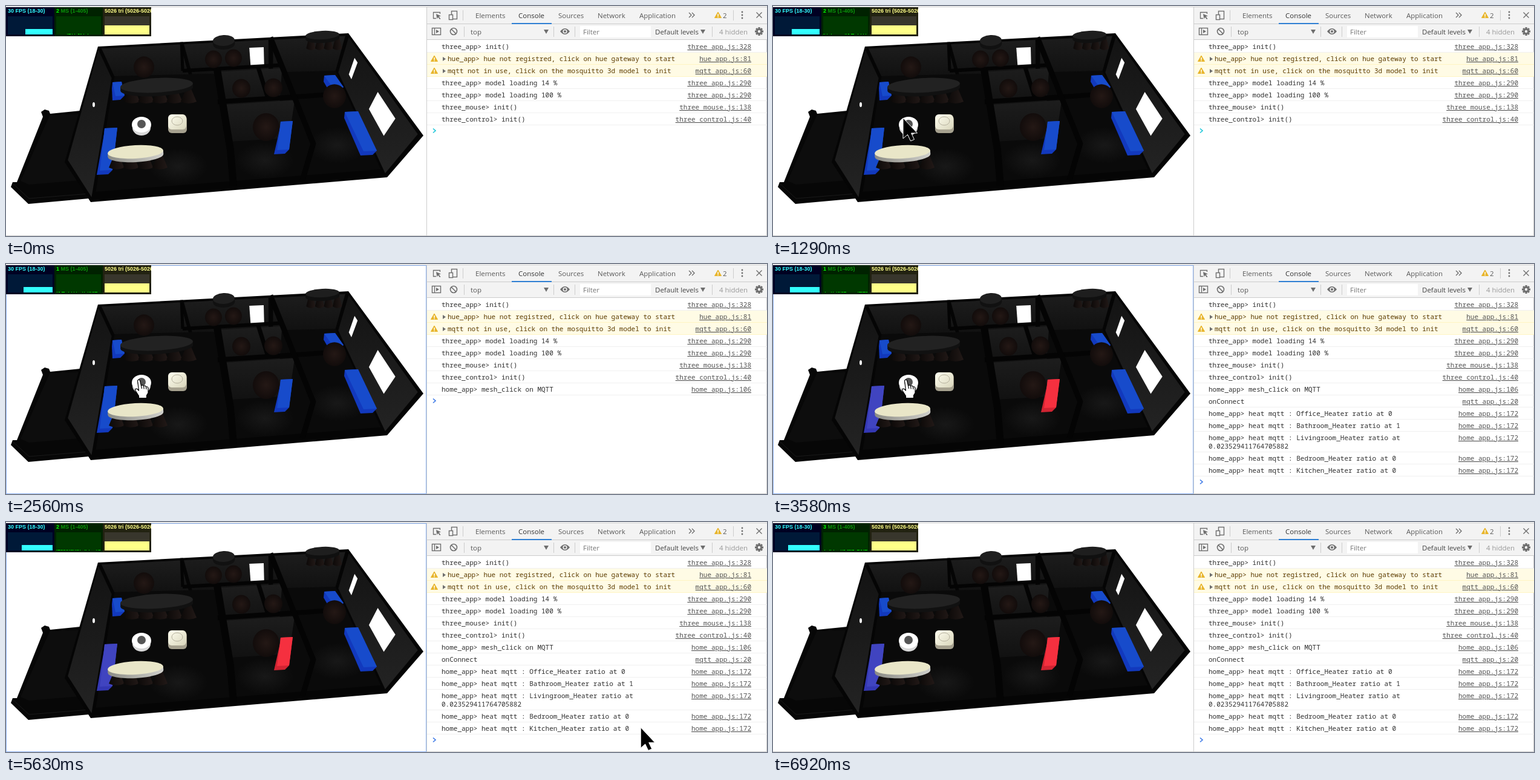
These frames come from a looping animation (1258 by 380 pixels, 6970 ms). An HTML page:

```html
<!DOCTYPE html>
<html lang="en">
<head>
<meta charset="utf-8">
<title>Home model and console</title>
<style>
html, body { margin: 0; width: 100%; height: 100%; overflow: hidden; background: #fff; }
svg { display: block; width: 1258px; height: 380px; }
text { white-space: pre; }
.ui { font: 11.5px "Open Sans", sans-serif; fill: #5a5a5a; }
.log { font: 11px "Noto Sans Mono", monospace; fill: #303030; }
.stat { font: bold 9px "Liberation Sans", Arial, sans-serif; }
</style>
</head>
<body>
<svg id="stage" viewBox="0 0 1258 380" xmlns="http://www.w3.org/2000/svg"></svg>
<script>
const LOOP = 6970, STEPS = 90;
const HAND_ON = 1700, CLICK = 2480, CONNECT = 3190, HEAT = 3270, LEAVE = 3840, BLUR = 6750;
// Cursor key points: time, x, y
const ENTER = [[70, 1076, 355], [225, 927, 300], [300, 777, 290], [530, 330, 301], [1140, 215, 185]];
const EXIT = [[LEAVE, 215, 185], [4320, 384, 297], [4490, 657, 330], [5040, 916, 331], [5650, 1048, 339], [6000, 1168, 384]];

const poly = (pts, fill, more = '') => `<polygon points="${pts}" fill="${fill}" ${more}/>`;
const rect = (x, y, w, h, fill, more = '') => `<rect x="${x}" y="${y}" width="${w}" height="${h}" fill="${fill}" ${more}/>`;
const oval = (x, y, rx, ry, fill, more = '') => `<ellipse cx="${x}" cy="${y}" rx="${rx}" ry="${ry}" fill="${fill}" ${more}/>`;
const line = (d, color, w = 1) => `<path d="${d}" fill="none" stroke="${color}" stroke-width="${w}"/>`;
const text = (cls, x, y, s, more = '') => `<text class="${cls}" x="${x}" y="${y}" ${more}>${s.replace(/>/g, '&gt;')}</text>`;
const grad = (id, a, b, dir) => `<linearGradient id="${id}" ${dir}><stop stop-color="${a}"/><stop offset="1" stop-color="${b}"/></linearGradient>`;
const glow = (id, a, b) => `<radialGradient id="${id}"><stop stop-color="${a}"/><stop offset="1" stop-color="${b}"/></radialGradient>`;
const repeat = (n, f) => Array.from({length: n}, (_, i) => f(i)).join('');

const defs = '<defs>' +
  grad('wall', '#1d1d1d', '#111', 'x2="0" y2="1"') +
  grad('side', '#131313', '#232323', 'x2="0" y2="1"') +
  grad('cone', '#0c0908', '#221917', 'x2="1" y2="0"') +
  grad('cream', '#fffef0', '#d9d6bc', 'x2="1" y2="1"') +
  grad('rim', '#8c8c86', '#d0d0cb', 'x2="1" y2="0"') +
  glow('ball', '#241815', '#120c0b') + glow('floor', '#181818', '#0a0a0a') +
  '<clipPath id="tri"><rect x="160" y="2" width="80" height="48"/></clipPath></defs>';

// Projective map from the unit square to four screen corners.
function plane([[x0, y0], [x1, y1], [x2, y2], [x3, y3]]) {
  const ax = x1 - x2, ay = y1 - y2, bx = x3 - x2, by = y3 - y2;
  const sx = x0 - x1 + x2 - x3, sy = y0 - y1 + y2 - y3, det = ax * by - bx * ay;
  const g = (sx * by - bx * sy) / det, h = (ax * sy - sx * ay) / det;
  return (u, v) => {
    const w = 1 + g * u + h * v;
    return [(x0 + (x1 - x0 + g * x1) * u + (x3 - x0 + h * x3) * v) / w,
      (y0 + (y1 - y0 + g * y1) * u + (y3 - y0 + h * y3) * v) / w];
  };
}
const roof = plane([[152, 67], [566, 45], [690, 214], [97, 258]]);
const ground = plane([[175, 116], [548, 107], [630, 283], [140, 324]]);

// Plan position u, v at height h (0 floor, 1 wall top).
function at(u, v, h) {
  const a = ground(u, v), b = roof(u, v);
  return a.map((n, i) => (n + (b[i] - n) * h).toFixed(1)).join();
}
const wall = (u0, v0, u1, v1, fill, low = 0, high = .93) =>
  poly([at(u0, v0, low), at(u1, v1, low), at(u1, v1, high), at(u0, v0, high)].join(' '), fill);
const beam = (u0, v0, u1, v1, w) =>
  line(`M${at(u0, v0, 1)}L${at(u1, v1, 1)}${v1 === 1 ? 'L' + at(u1, v1, .1) : ''}`, '#040404', w);

const ball = ([x, y, r]) => oval(x, y, r, r * 1.04, 'url(#ball)');
const disc = (x, y, rx, ry, h, top, side) =>
  `<g transform="rotate(-3 ${x} ${y})">${oval(x, y + h, rx, ry, side)}${rect(x - rx, y, 2 * rx, h, side)}${oval(x, y, rx, ry, top)}</g>`;

function table(x, y, rx, ry, stools, top, side) {
  const w = rx * 1.1 / stools, foot = y + 15 + ry;
  return repeat(stools, i => {
    const cx = x + rx * (-.68 + 1.56 * i / (stools - 1));
    return `<path d="M${cx - w * .35} ${foot - 20}h${w * .7}L${cx + w} ${foot}q${-w} 6 ${-2 * w} 0Z" fill="url(#cone)"/>`;
  }) + disc(x, y, rx, ry, 6, top, side);
}

// Slab with its top edge at x, y, running along ex, ey.
function heater(id, x, y, w, ex, ey) {
  const bx = x + ex, by = y + ey;
  return poly(`${x},${y} ${x + w},${y - 1} ${bx + w},${by - 1} ${bx + w - 7},${by + 6} ${bx - 5},${by + 7} ${x - 1},${y + 10}`, '#1239bd', `id="${id}Side"`) +
    poly(`${x},${y} ${x + w},${y - 1} ${bx + w},${by - 1} ${bx},${by}`, '#174bcb', `id="${id}Face"`);
}

function house() {
  const hull = [at(0, 0, 1), at(1, 0, 1), at(1, 1, 1), at(1, 1, 0), at(0, 1, 0), at(0, 1, 1)].join(' ');
  const lamps = [[228, 101, 17], [343, 88, 14], [376, 86, 14], [389, 136, 15], [442, 135, 15], [430, 200, 22]];
  return [
    poly('58,175 64,171 71,173 73,178 133,172 137,318 37,327 8,299 11,291 18,291 61,183', '#070707'),
    poly('72,181 127,178 101,252 122,288 38,295 24,289', '#0d0d0d'),
    line('M12 294L38 318L138 310', '#1a1a1a'),
    poly(hull, '#050505'),
    poly([at(.01, 0, 0), at(.99, 0, 0), at(.99, .94, 0), at(.01, .94, 0)].join(' '), '#0a0a0a'),
    [[285, 265], [428, 255], [548, 230]].map(([x, y]) => oval(x, y, 48, 30, 'url(#floor)')).join(''),
    wall(.01, 0, .315, 0, 'url(#wall)'),
    wall(.33, 0, .67, 0, 'url(#wall)'),
    wall(.69, 0, .99, 0, 'url(#wall)'),
    wall(0, .02, 0, .97, 'url(#side)'),
    wall(1, .02, 1, .97, 'url(#side)'),
    wall(.59, 0, .65, 0, '#fff', .16, .73),
    wall(1, .18, 1, .235, '#fff', .3, .72),
    wall(1, .555, 1, .79, '#fff', .33, .74),
    oval(145, 163, 2, 4, '#fff'),
    wall(.45, .34, .68, .34, 'url(#wall)'),
    wall(.45, .65, .68, .65, 'url(#wall)'),
    beam(.323, 0, .323, .335, 5),
    beam(.323, .335, .68, .335, 6),
    beam(.592, .335, .592, .64, 7),
    beam(.43, .645, .81, .645, 8),
    beam(.678, 0, .678, 1, 9),
    beam(.445, .335, .445, 1, 12),
    lamps.map(ball).join(''),
    disc(360, 57, 18, 9, 6, '#1f1f1f', '#111'),
    table(523, 48, 28, 7, 4, '#1e1e1e', '#101010'),
    heater('back', 176, 126, 15, 5, 23),
    table(249, 131, 60, 12, 5, '#222', '#111'),
    heater('bed', 526, 115, 18, 14, 20),
    ball([543, 149, 19]),
    heater('kitchen', 560, 175, 22, 31, 65),
    heater('bath', 454, 191, 20, -6, 47),
    heater('live', 163, 202, 21, -8, 70),
    table(214, 241, 46, 11, 4, '#e9e6c8', 'url(#rim)'),
    // gateway and broker models
    rect(268, 181, 31, 29, '#a6a18f', 'rx="6"'),
    rect(268, 179, 30, 25, 'url(#cream)', 'rx="6"'),
    oval(283, 190, 9, 7, 'none', 'stroke="#b5b09d"'),
    oval(224, 201, 15, 13, '#d8d8d8'),
    oval(224, 196, 16, 13, '#fff'),
    oval(224, 195, 7, 7, '#555')
  ].join('');
}

function stats() {
  const panel = (x, bg, field) => rect(x, 2, 80, 48, bg) + rect(x + 3, 17, 74, 30, field);
  return panel(0, '#002', '#001938') + panel(80, '#020', '#003800') + panel(160, '#221', '#38362c') +
    text('stat', 3, 11, '30 FPS (18-30)', 'fill="#3ff"') +
    text('stat', 83, 11, '2', 'id="ms" fill="#0f0"') +
    text('stat', 90.5, 11, 'MS (1-405)', 'fill="#0a960a"') +
    text('stat', 163, 11, '5026 tri (5026-5026)', 'fill="#ff8" clip-path="url(#tri)"') +
    rect(163, 32, 74, 15, '#ff8') + rect(32, 38, 45, 9, '#3ff', 'id="fps"') +
    '<path id="bars" fill="#0f0"/>';
}

const GRAY = '#6e6e6e';
const warn = (x, y) => poly(`${x},${y - 5} ${x + 5.5},${y + 4.5} ${x - 5.5},${y + 4.5}`, '#e8b52b', 'stroke="#e8b52b" stroke-linejoin="round"') +
  rect(x - .7, y - 2, 1.5, 4, '#fff') + rect(x - .7, y + 2.7, 1.5, 1.4, '#fff');
const caret = (x, y) => poly(`${x - 4},${y - 3} ${x + 4},${y - 3} ${x},${y + 4}`, GRAY);
const label = (x, y, s, color) => text('ui', x, y, s, color ? `style="fill:${color}"` : '');

function toolbars() {
  const frame = (x, y, w, h) => rect(x, y, w, h, '#f3f3f3', `stroke="${GRAY}" stroke-width="1.4"`);
  const split = (y, xs) => xs.map(x => line(`M${x}.5 ${y}v17`, '#ccc')).join('');
  const tabs = [['Elements', 776], ['Console', 847, '#333'], ['Sources', 913], ['Network', 978], ['Application', 1047]];
  return rect(696, 2, 562, 54, '#f3f3f3') +
    line('M696 29.5H1258M696 55.5H1258', '#ccc') +
    split(7, [755, 1202]) + split(34, [757, 905, 940, 1167]) +
    tabs.map(([s, x, color]) => label(x, 20, s, color)).join('') + rect(836, 28, 66, 2, '#2f7fd3') +
    // element picker, device and overflow icons
    line('M717.5 13V10.5H706.5V20.5H711', GRAY, 1.3) +
    poly('711,13 719,16.5 715.5,17.5 718.5,21 717,22 714,18.6 712.5,21.5', GRAY) +
    frame(736.5, 8.5, 9, 13) + frame(732.5, 14.5, 6, 8) +
    [1129, 1134].map(x => line(`M${x} 11l4 4l-4 4`, GRAY, 1.4)).join('') +
    warn(1177, 15) + label(1185, 20, '2') +
    repeat(3, i => oval(1217, 10 + 5 * i, 1.4, 1.4, GRAY)) +
    line('M1240.5 10.5l9 9m0 -9l-9 9', GRAY, 1.4) +
    // console controls
    frame(704.5, 36.5, 14, 11) + line('M708.5 36V48', GRAY, 1.3) + poly('711,39 716,42 711,45', GRAY) +
    oval(740, 42, 5.5, 5.5, 'none', `stroke="${GRAY}" stroke-width="1.6"`) + line('M736 38l8 8', GRAY, 1.6) +
    label(768, 47, 'top') + caret(893, 42) +
    `<path d="M916 42Q924 32 932 42Q924 52 916 42Z" fill="${GRAY}"/>` + oval(924, 42, 3.6, 3.6, '#f3f3f3') + oval(924, 42, 2, 2, GRAY) +
    rect(949, 33, 117, 19, '#fff') + label(954, 47, 'Filter', '#757575') +
    label(1073, 47, 'Default levels', '#444') + caret(1152, 42) + label(1179, 47, '4 hidden', '#999') +
    '<g transform="translate(1245 42)">' + repeat(8, i => rect(-1.6, -7, 3.2, 4, GRAY, `transform="rotate(${i * 45})"`)) +
    oval(0, 0, 5, 5, GRAY) + oval(0, 0, 2.2, 2.2, '#f3f3f3') + '</g>';
}

const RATIOS = {Office: '0', Bathroom: '1', Livingroom: '0.023529411764705882', Bedroom: '0', Kitchen: '0'};
const LOG = [
  [0, 'three_app> init()', 'three_app.js:328'],
  [0, 'hue_app> hue not registred, click on hue gateway to start', 'hue_app.js:81', true],
  [0, 'mqtt not in use, click on the mosquitto 3d model to init', 'mqtt_app.js:60', true],
  [0, 'three_app> model loading 14 %', 'three_app.js:290'],
  [0, 'three_app> model loading 100 %', 'three_app.js:290'],
  [0, 'three_mouse> init()', 'three_mouse.js:138'],
  [0, 'three_control> init()', 'three_control.js:40'],
  [CLICK, 'home_app> mesh_click on MQTT', 'home_app.js:106'],
  [CONNECT, 'onConnect', 'mqtt_app.js:20'],
  ...Object.entries(RATIOS).map(([room, ratio]) =>
    [HEAT, `home_app> heat mqtt : ${room}_Heater ratio at${ratio.length > 1 ? '\n' : ' '}${ratio}`, 'home_app.js:172'])
];

const rows = [];
function consoleLog() {
  let y = 57, out = '';
  LOG.forEach(([start, msg, link, isWarn], i) => {
    const parts = msg.split('\n'), h = 6 + 14 * parts.length;
    out += `<g id="row${i}">` +
      (isWarn ? rect(696, y, 562, h, '#fffbe5') + warn(708, y + 10) + poly(`722,${y + 7} 727,${y + 10.5} 722,${y + 14}`, GRAY) : '') +
      line(`M696 ${y + h - .5}H1258`, isWarn ? '#fff5c2' : '#f0f0f0') +
      parts.map((s, n) => text('log', isWarn ? 730 : 720, y + 14 + 14 * n, s, isWarn ? 'style="fill:#5c3c00"' : '')).join('') +
      text('log', 1232, y + 14, link, 'text-anchor="end" text-decoration="underline" style="fill:#545454"') + '</g>';
    y += h;
    rows.push({start, bottom: y});
  });
  return out + '<path id="prompt" d="M706 -3.5l4 3.5l-4 3.5" fill="none" stroke-width="1.6"/>';
}

const arrow = '<path id="arrow" d="M0 0V34L7.5 27.5L12.5 38L18.5 35.5L13.5 25H23.5Z" stroke="#fff"/>';
const hand = '<path id="hand" d="M217.5 192.5q2 -2.5 4 0l2 8.500q2.500 -2 4 .5q2.500 -1.500 4 1.500q3 -1 3.500 2v8l-2.500 4v4.500h-13v-3.500l-6 -9.500q0 -3.500 3.500 -2l2.500 2.500Z' +
  'M223.5 201l1 5m3 -4.500l.7 5m3.300 -3.500l.5 4" fill="#fff" stroke="#000" stroke-width="1.2" stroke-linejoin="round"/>';

document.getElementById('stage').innerHTML = defs + rect(0, 0, 1258, 380, '#fff') + house() +
  line('M0 1.5H1258M695.5 2V380M0 379.5H1258M1257.5 2V380', '#ccc') +
  rect(.5, 2.5, 694, 377, 'none', 'id="focus" stroke="#8fb5f5"') +
  stats() + toolbars() + consoleLog() + hand + arrow;

const $ = id => document.getElementById(id);
const show = (id, on) => $(id).setAttribute('display', on ? 'inline' : 'none');
const paint = (id, side, face) => {
  $(id + 'Side').setAttribute('fill', side);
  $(id + 'Face').setAttribute('fill', face);
};

function along(path, t) {
  const i = path.findIndex(p => p[0] > t);
  if (i < 1) return path[i ? path.length - 1 : 0].slice(1);
  const a = path[i - 1], b = path[i], k = (t - a[0]) / (b[0] - a[0]);
  return [1, 2].map(n => a[n] + (b[n] - a[n]) * k);
}

const noise = n => { const s = Math.sin(n * 12.9898) * 43758.5453; return s - Math.floor(s); };

function drawStats(t) {
  const sec = Math.max(0, Math.floor((t - 400) / 1030) + 1);
  $('fps').setAttribute('x', 32 - sec);
  $('fps').setAttribute('width', 45 + sec);
  $('ms').textContent = sec < 2 || sec === 6 ? 2 : sec > 6 ? 3 : 1;
  const shift = Math.floor(t * .03);
  $('bars').setAttribute('d', repeat(74, i => {
    const v = (noise(i + shift) + noise(Math.floor((i + shift) / 9) + 300)) / 2;
    return v > .65 ? `M${83 + i} 46h1v1h-1z` : '';
  }));
}

function draw(ms) {
  const t = Math.round(ms / LOOP * STEPS) % STEPS * LOOP / STEPS;
  drawStats(t);

  let end = 0;
  rows.forEach((r, i) => {
    show('row' + i, t >= r.start);
    if (t >= r.start) end = r.bottom;
  });
  $('prompt').setAttribute('transform', `translate(0 ${end + 9})`);
  $('prompt').setAttribute('stroke', t < CLICK ? '#19c5d8' : '#3b78e7');

  const hot = t >= HEAT;
  paint('bath', hot ? '#d02432' : '#1239bd', hot ? '#f5303f' : '#174bcb');
  paint('live', hot ? '#3438b4' : '#1239bd', hot ? '#4044c0' : '#174bcb');

  const leaving = t >= LEAVE, isHand = t >= HAND_ON && !leaving;
  show('focus', t >= CLICK && t < BLUR);
  show('hand', isHand);
  show('arrow', t >= 70 && t < 6000 && !isHand);
  const [x, y] = along(leaving ? EXIT : ENTER, t);
  $('arrow').setAttribute('transform', `translate(${x.toFixed(1)} ${y.toFixed(1)})`);
}

const began = performance.now();
function tick() {
  draw((performance.now() - began) % LOOP);
  requestAnimationFrame(tick);
}
tick();
</script>
</body>
</html>
```
